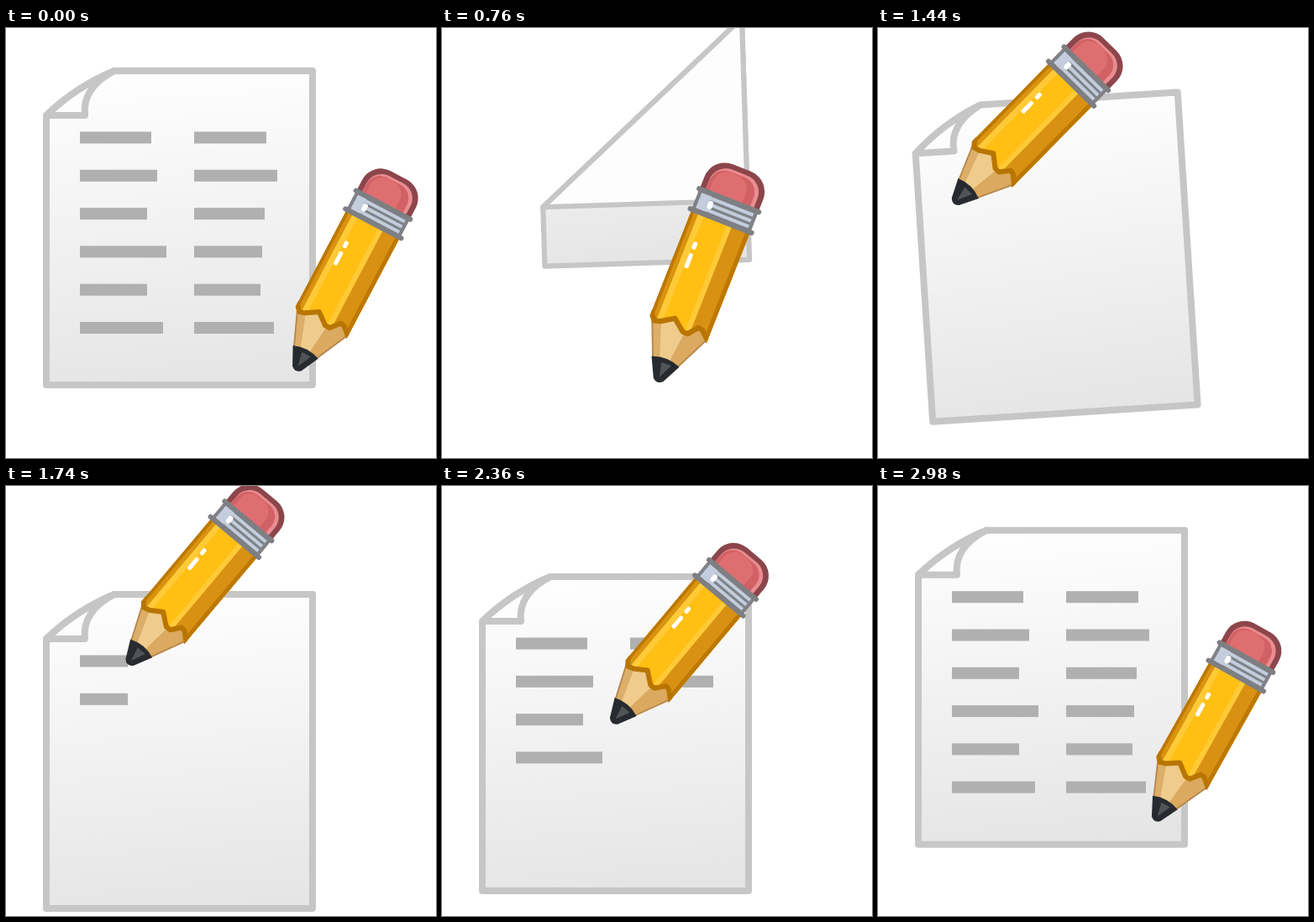
An HTML page with a canvas that plays this animation: 512x512 px, repeating every 3 s.

```html
<!DOCTYPE html>
<html lang="en">
<head>
<meta charset="utf-8">
<title>Pencil and page</title>
<style>
html, body { margin: 0; width: 100%; height: 100%; overflow: hidden; background: #fff; }
canvas { display: block; width: 512px; height: 512px; }
</style>
</head>
<body>
<canvas id="stage" width="512" height="512"></canvas>
<script>
const ctx = document.getElementById('stage').getContext('2d');
const LOOP = 3000, WRITE = 1640, CYCLE = 520, STROKE = 400;
const LEFT = 87, GAP = 45.3;
const BAR_ENDS = [[173, 310], [180, 323], [168, 308], [191, 305], [168, 303], [187, 319]];

const ramp = (t, a, b) => Math.min(1, Math.max(0, (t - a) / (b - a)));
const smooth = u => u * u * (3 - 2 * u);

// Key poses while the page turns: time, x, y, degrees, scale
const PAGE_TURN = [
  [0, 206.5, 238, 0, 1], [440, 221, 139.6, 27, .825], [620, 230, 115, 15, .77],
  [1080, 257, 230, -35, .768], [1440, 211, 272.5, -3.7, .997], [WRITE, 206.5, 316, 0, 1]
];
const PENCIL_SWING = [
  [0, 345, 408, 27.8, 1], [440, 376, 477, 5.3, 1], [1080, 117.5, 323, 40.5, 1.085],
  [1440, 90, 209, 44.5, 1.01], [WRITE, LEFT, 212.5, 40, 1]
];

// Monotone cubic interpolation, at rest at both ends
function pose(keys, t) {
  const i = keys.findIndex(k => k[0] > t) - 1;
  const a = keys[i], b = keys[i + 1], h = b[0] - a[0], u = (t - a[0]) / h;
  const slope = (j, c) => keys[j] && keys[j + 1]
    ? (keys[j + 1][c] - keys[j][c]) / (keys[j + 1][0] - keys[j][0]) : 0;
  const blend = (p, q) => p * q > 0 ? 2 * p * q / (p + q) : 0;
  return [1, 2, 3, 4].map(c => {
    const d = slope(i, c), m0 = blend(slope(i - 1, c), d), m1 = blend(d, slope(i + 1, c));
    return a[c] + (b[c] - a[c]) * smooth(u) + h * u * (1 - u) * (m0 * (1 - u) - m1 * u);
  });
}

function pagePose(t) {
  if (t < WRITE) return pose(PAGE_TURN, t);
  return [206.5, 316 - 78 * ramp(t, 2126, LOOP), 0, 1];
}

// Three strokes, each writing two rows; the last one leaves the page
function pencilPose(t, pageY) {
  if (t < WRITE) return pose(PENCIL_SWING, t);
  const pass = Math.floor((t - WRITE) / CYCLE), dt = (t - WRITE) % CYCLE;
  const last = pass === 2;
  const u = ramp(dt, 0, last ? LOOP - WRITE - 2 * CYCLE : STROKE);
  const back = smooth(ramp(dt, STROKE, CYCLE));
  const leave = last ? u * u : 0;
  return [
    LEFT + (last ? 258 : 230) * (u - back),
    pageY - 103.5 + 2 * GAP * (pass + back) + 92 * leave,
    40 - 12.2 * leave, 1
  ];
}

function finish(fill, stroke, width) {
  if (fill) { ctx.fillStyle = fill; ctx.fill(); }
  if (stroke) { ctx.strokeStyle = stroke; ctx.lineWidth = width; ctx.stroke(); }
}
function poly(points, fill) {
  ctx.beginPath();
  points.forEach(p => ctx.lineTo(...p));
  ctx.closePath();
  finish(fill);
}
function rect(x, y, w, h, fill) {
  ctx.fillStyle = fill;
  ctx.fillRect(x, y, w, h);
}
function round(x, y, w, h, r, fill) {
  ctx.beginPath();
  ctx.roundRect(x, y, w, h, r);
  finish(fill);
}
function place([x, y, degrees], sx, sy) {
  ctx.save();
  ctx.translate(x, y);
  ctx.rotate(degrees * Math.PI / 180);
  ctx.scale(sx, sy);
  ctx.lineJoin = ctx.lineCap = 'round';
}

function drawShadow(t, x, y) {
  const alpha = .075 * Math.sin(Math.PI * ramp(t, 2360, LOOP));
  ctx.save();
  ctx.translate(x, y);
  ctx.beginPath();
  ctx.moveTo(0, 0);
  ctx.lineTo(62, 38);
  ctx.lineTo(228, 59);
  ctx.quadraticCurveTo(250, 61, 254, 40);
  ctx.lineTo(257, 16);
  ctx.quadraticCurveTo(254, -1, 238, -8);
  ctx.lineTo(66, -29);
  finish(`rgba(0,0,0,${alpha})`);
  ctx.restore();
}

function drawBars(t, reach) {
  BAR_ENDS.forEach((ends, row) => {
    const start = WRITE + CYCLE * (row >> 1);
    const old = t < 620, done = t >= start + STROKE;
    if (!old && t < start) return;
    ends.forEach((end, col) => {
      const x = col ? 224 : 88;
      const stop = old || done ? end : Math.min(end, reach);
      rect(x, 123.5 + GAP * row, Math.max(0, stop - x), 14, '#b0b0b0');
    });
  });
}

function drawPage(t, page, tip) {
  // The corner folds down over the sheet, then opens onto a blank one
  const fold = ramp(t, 0, 600) ** 1.56 * (1 - smooth(ramp(t, 620, 1020)));
  const side = Math.min(1, fold / .616), small = 1 - side;
  const y = 104 + 321 * fold, top = 129 + 236 * side, corner = 94 + 271 * side;

  place(page, page[3], page[3]);
  ctx.translate(-206.5, -238);
  const edge = () => {
    ctx.beginPath();
    ctx.moveTo(48, y);
    ctx.quadraticCurveTo((48 + top) / 2 - 5 * small, (y + 51) / 2 - 7.5 * small, top, 51);
  };
  const outline = () => {
    edge();
    [[365, 51], [365, 425], [48, 425]].forEach(p => ctx.lineTo(...p));
    ctx.closePath();
  };
  const paper = ctx.createLinearGradient(190, 51, 220, 425);
  paper.addColorStop(0, '#fefefe');
  paper.addColorStop(1, '#e5e5e5');

  ctx.save();
  outline();
  finish(paper);
  ctx.clip();
  drawBars(t, tip[0]);
  drawShadow(t, tip[0] - page[0] + 206.5, tip[1] - page[1] + 238);
  ctx.restore();
  outline();
  finish(null, '#c6c6c6', 8);

  edge();
  ctx.quadraticCurveTo(corner - 4 * small, (y + 51) / 2 - 6 * small, corner, y);
  ctx.closePath();
  finish('#fdfdfd', '#c6c6c6', 8);
  ctx.restore();
}

// Drawn with the tip at the origin and y pointing to the eraser
function drawPencil(pencil) {
  place(pencil, pencil[3], -pencil[3]);

  // Eraser
  round(-36, 200, 72, 63, [0, 0, 25, 25], '#8c464b');
  round(-29.5, 200, 59, 57, [0, 0, 20, 20], '#ea8d90');
  round(-29, 200, 54, 54, [0, 0, 18, 18], '#d26165');
  round(-25, 200, 40, 53, [0, 0, 16, 16], '#df6e71');

  // Wood
  poly([[-36, 72], [-16, 24], [16, 24], [36, 66], [20, 76]], '#b8874a');
  poly([[-34, 72], [-14, 24], [-7, 24], [-23, 70]], '#dcae69');
  poly([[9, 68], [4, 24], [14, 24], [34, 66], [20, 76]], '#dba95f');
  poly([[9, 68], [4, 24], [-7, 24], [-23, 70], [-9, 76]], '#efcb8c');

  // Lead
  ctx.beginPath();
  ctx.moveTo(-17, 25);
  ctx.quadraticCurveTo(0, 32, 17, 25);
  ctx.lineTo(6, 3);
  ctx.quadraticCurveTo(0, -3, -6, 3);
  finish('#272b2f');
  poly([[-4, 23], [0, 6], [8, 23]], '#505357');

  // Body with its scalloped lower edge
  const wave = [[-36, 72], [-29, 64], [-22, 66], [-8, 75], [6, 64], [12, 64], [21, 75], [26, 74], [36, 65]];
  ctx.save();
  ctx.beginPath();
  ctx.rect(-36, 50, 72, 150);
  ctx.clip();
  ctx.save();
  ctx.beginPath();
  [...wave, [36, 200], [-36, 200]].forEach(p => ctx.lineTo(...p));
  ctx.clip();
  [[-36, '#bd7800'], [-32, '#d9930f'], [-27, '#ffca38'], [-20, '#ffbf13'], [8, '#ffca38'],
   [14, '#d89113'], [31, '#bd7800']].forEach(([left, color]) => rect(left, 55, 40 - left, 150, color));
  ctx.restore();
  ctx.beginPath();
  wave.forEach(p => ctx.lineTo(...p));
  finish(null, '#b87500', 6);
  ctx.restore();
  round(-20, 133, 5, 18, 2, '#fff');
  round(-20, 156, 5, 9, 2, '#fff');

  // Ferrule
  rect(-36, 198, 72, 25, '#7f8288');
  for (let i = 0; i < 3; i++) rect(-32, 201.5 + 7 * i, 64, 4, '#c3cddd');
  rect(-32, 201, 12, 19, '#c3cddd');
  round(-40.5, 195, 81, 6, 3, '#7e7f83');
  round(-39.5, 220, 79, 6, 3, '#7e7f83');
  round(-21, 205, 6, 10, 3, '#fff');
  ctx.restore();
}

const start = performance.now();
function frame() {
  const t = (performance.now() - start) % LOOP;
  const page = pagePose(t), pencil = pencilPose(t, page[1]);
  rect(0, 0, 512, 512, '#fff');
  drawPage(t, page, pencil);
  drawPencil(pencil);
  requestAnimationFrame(frame);
}
frame();
</script>
</body>
</html>
```
